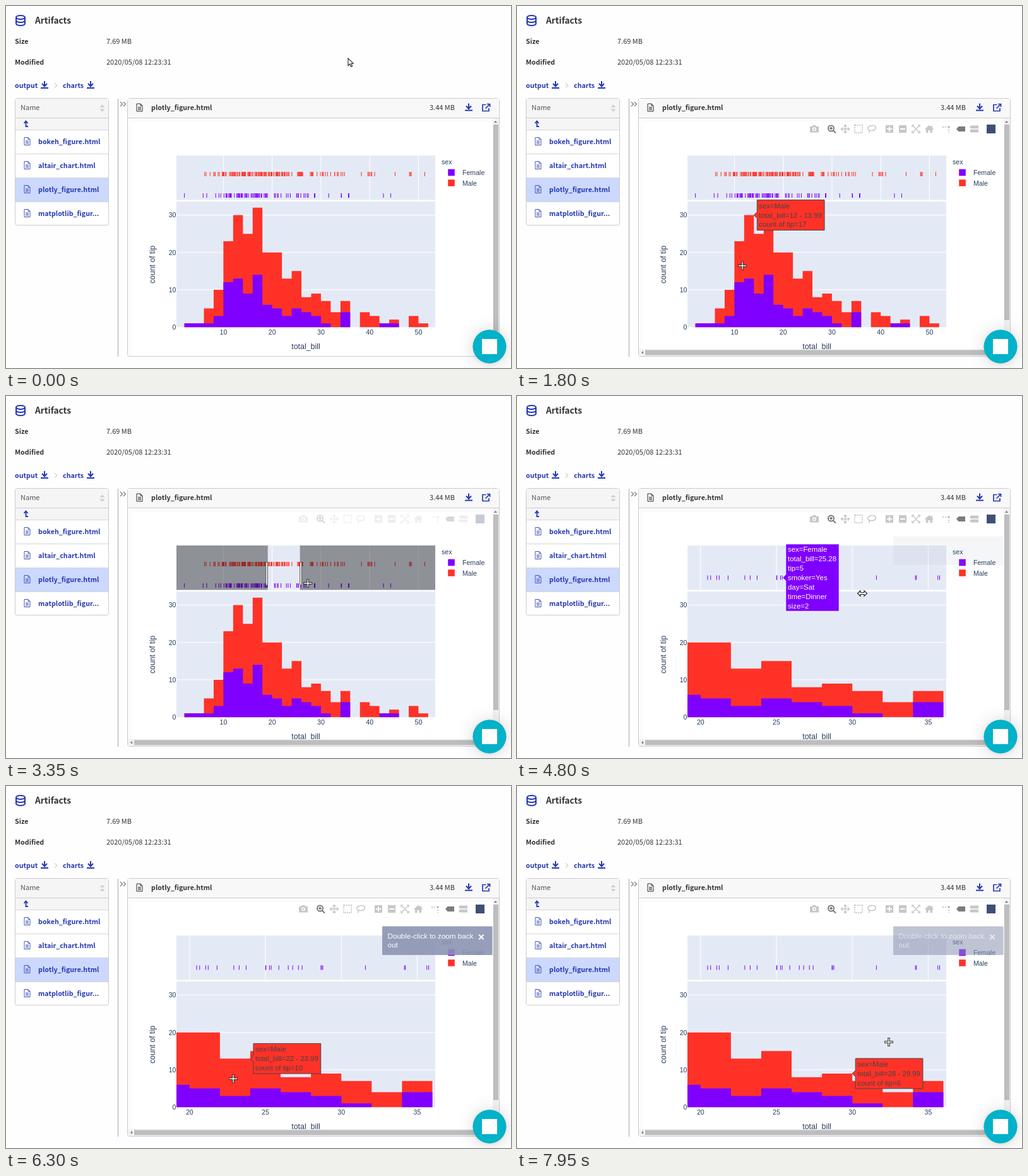
An HTML page with a canvas that plays this animation: 800x574 px, repeating every 8 s.

```html
<!DOCTYPE html>
<html lang="en">
<head>
<meta charset="utf-8">
<title>Artifacts</title>
<style>
html, body { margin: 0; width: 100%; height: 100%; overflow: hidden; background: #fefefe; }
canvas { display: block; }
</style>
</head>
<body>
<canvas id="stage" width="800" height="574"></canvas>
<script>
const ctx = document.getElementById('stage').getContext('2d');
const LOOP = 8000;
const UI = '"Noto Sans CJK JP", "Noto Sans CJK SC", "Noto Sans CJK", "Noto Sans", sans-serif';
const PLOT = '"Liberation Sans", Arial, sans-serif';
const BLUE = '#2539b0', INK = '#333', RED = '#ff3228', PURPLE = '#7f00ff', PANEL = '#e4eaf5', AXIS = '#2a3f5f';

// Timeline
const ENTER = 900, PRESS = 3160, RELEASE = 4400, ZOOM = 4600, NOTE_OUT = 7630;
const HOVER_LAG = 150, DRAG_LAG = 38;
const START = { x: 414.7, y: 280 };

// Pointer stops: time, x, y
const path = [
  [250, 542, 83], [880, 500, 172], [1650, 367, 407], [1800, 357, 412],
  [2500, START.x, START.y], [PRESS, START.x, START.y], [3350, 478, 297],
  [3650, 547, 313], [4850, 547, 313], [5450, 386.4, 478], [6000, 386.4, 478],
  [6700, 325, 446], [6950, 345, 453], [7600, 505, 478], [7800, 525, 478], [7950, 589, 406]
];

// Histogram counts per bin
const total = [1, 1, 5, 10, 23, 30, 25, 32, 20, 20, 13, 15, 8, 9, 7, 4, 7, 0, 4, 3, 1, 2, 0, 3, 1];
const women = [1, 1, 1, 3, 12, 13, 9, 14, 6, 5, 3, 5, 4, 3, 1, 0, 4, 0, 0, 0, 1, 1, 0, 0, 0];
const men = total.map((n, i) => n - women[i]);
const binStart = i => 2 + 2 * i;

// Single bills are scattered inside their bins
let seed = 7;
const random = () => (seed = (seed * 16807) % 2147483647) / 2147483647;
const scatter = counts => counts.flatMap((n, i) =>
  Array.from({ length: n }, () => binStart(i + random())));
const womenBills = scatter(women), menBills = scatter(men);

const clamp = v => Math.max(0, Math.min(1, v));
const smooth = v => { v = clamp(v); return v * v * (3 - 2 * v); };
const cubic = v => { v = clamp(v); return v < .5 ? 4 * v ** 3 : 1 - 4 * (1 - v) ** 3; };

function pointer(t) {
  let i = 1;
  while (i < path.length - 1 && path[i][0] < t) i++;
  const [t0, x0, y0] = path[i - 1], [t1, x1, y1] = path[i];
  const k = clamp((t - t0) / (t1 - t0));
  return { x: x0 + (x1 - x0) * k, y: y0 + (y1 - y0) * k };
}

function rect(x, y, w, h, color) {
  ctx.fillStyle = color;
  ctx.fillRect(x, y, w, h);
}
function text(s, x, y, size, color, { bold = false, font = PLOT, align = 'left' } = {}) {
  ctx.font = `${bold ? 700 : 400} ${size}px ${font}`;
  ctx.textAlign = align;
  ctx.fillStyle = color;
  ctx.fillText(s, x, y);
}
const label = (s, x, y, color = INK, bold = true, size = bold ? 10.7 : 11) =>
  text(s, x, y, size, color, { bold, font: UI });

function icon(x, y, d, color, { width = 1.5, fill = false } = {}) {
  ctx.save();
  ctx.translate(x, y);
  const p = new Path2D(d);
  if (fill) {
    ctx.fillStyle = color;
    ctx.fill(p, 'evenodd');
  } else {
    ctx.strokeStyle = color;
    ctx.lineWidth = width;
    ctx.stroke(p);
  }
  ctx.restore();
}
function box(x, y, w, h, r, fill, stroke, width = 1) {
  ctx.beginPath();
  ctx.roundRect(x, y, w, h, r);
  ctx.fillStyle = fill;
  ctx.fill();
  ctx.strokeStyle = stroke;
  ctx.lineWidth = width;
  ctx.stroke();
}

const download = (x, y) => icon(x, y, 'M0-6V2M-4-2L0 2.5L4-2M-6 5H6', BLUE, { width: 2 });
const sheet = (x, y, color) =>
  icon(x, y, 'M-4.5-6H1.5L4.5-3V6H-4.5ZM1.5-6V-3H4.5M-2.5-.5H2.5M-2.5 1.5H2.5M-2.5 3.5H2.5', color, { width: 1 });

function drawPage() {
  rect(0, 0, 800, 574, '#fefefe');
  icon(23, 23, 'M-7-5A7 3 0 0 1 7-5A7 3 0 0 1-7-5V5A7 3 0 0 0 7 5V-5M-7 0A7 3 0 0 0 7 0', BLUE, { width: 2 });
  label('Artifacts', 46, 28, INK, true, 13.7);
  label('Size', 14, 60);
  label('7.69 MB', 159, 60, INK, false);
  label('Modified', 14, 93);
  label('2020/05/08 12:23:31', 159, 93, INK, false);
  label('output', 14, 130, BLUE);
  download(61, 125);
  icon(79, 126, 'M-2-3.5L2 0L-2 3.5', '#bbb', { width: 1 });
  label('charts', 90, 130, BLUE);
  download(134, 125);

  box(14.5, 146.5, 148, 201, 3, '#fff', '#ccc');
  rect(15, 147, 147, 49, '#f5f5f6');
  rect(15, 177, 147, 1, '#ccc');
  label('Name', 23, 165, '#555', false);
  icon(152.5, 162, 'M-4-1.5L0-5.5L4-1.5ZM-4 1.5L0 5.5L4 1.5Z', '#ccc', { fill: true });
  icon(31, 186.5, 'M4 4.5H.5V-3M-2.5-.5L.5-4L3.5-.5', BLUE, { width: 1.8 });
  rect(15, 272, 147, 38, '#ccd8fd');
  ['bokeh_figure.html', 'altair_chart.html', 'plotly_figure.html', 'matplotlib_figur...'].forEach((name, i) => {
    const y = 196 + i * 38;
    rect(15, y, 147, 1, '#d4d4d8');
    sheet(33.5, y + 18.5, '#4356b8');
    label(name, 51, y + 23, BLUE);
  });

  rect(177, 147, 1, 409, '#aaa');
  icon(185.5, 155.5, 'M-4.5-3.5L-1 0L-4.5 3.5M.5-3.5L4 0L.5 3.5', '#777', { width: 1.2 });
  box(192.5, 146.5, 589, 409, 3, '#fcfcfd', '#ccc');
  rect(193, 147, 588, 30, '#f8f8f9');
  rect(193, 177, 588, 1, '#ccc');
  sheet(211.5, 161, INK);
  label('plotly_figure.html', 230, 165);
  label('3.44 MB', 671, 165, INK, false);
  download(733, 160.5);
  icon(760.5, 161, 'M0-4.5H-5.5V5.5H4.5V1M1.5-5.5H6V-1M6-5.5L-1 1.5', BLUE, { width: 1.7 });
  rect(200, 184, 571, 371, '#fff');
}

const yMain = n => 509.2 - n * 5.923;
const xScale = zoomed => zoomed ? v => 290.8 + (v - 20) * 24.04 : v => 344.4 + (v - 10) * 7.725;

function drawRug(bills, x, y, color) {
  for (const px of bills.map(x)) {
    if (px > 270 && px < 680) rect(px - .5, y - 3.5, 1, 7, color);
  }
}

// One stepped outline per series leaves no seams between bars
function drawSteps(counts, x, color) {
  ctx.beginPath();
  ctx.moveTo(x(binStart(0)), yMain(0));
  counts.forEach((n, i) => {
    ctx.lineTo(x(binStart(i)), yMain(n));
    ctx.lineTo(x(binStart(i + 1)), yMain(n));
  });
  ctx.lineTo(x(binStart(counts.length)), yMain(0));
  ctx.fillStyle = color;
  ctx.fill();
}

function drawPlot(zoomed) {
  const x = xScale(zoomed);
  rect(270, 237, 410, 70.5, PANEL);
  rect(270, 310, 410, 199.3, PANEL);
  for (let v = zoomed ? 20 : 10; x(v) < 680; v += zoomed ? 5 : 10) {
    rect(x(v) - .5, 237, 1, 70.5, '#fff');
    text(v, x(v), 521, 10.6, AXIS, { align: 'center' });
  }
  for (let n = 0; n <= 30; n += 10) {
    if (n) rect(270, yMain(n) - .5, 410, 1, '#fff');
    text(n, 269.5, yMain(n) + 3.9, 10.6, AXIS, { align: 'right' });
  }
  ctx.save();
  ctx.beginPath();
  ctx.rect(270, 310, 410, 200);
  ctx.clip();
  drawSteps(total, x, RED);
  drawSteps(women, x, PURPLE);
  ctx.restore();
  if (!zoomed) drawRug(menBills, x, 266.5, RED);
  drawRug(womenBills, x, zoomed ? 288 : 300.5, PURPLE);

  text('total_bill', 475, 543.7, 12.4, AXIS, { align: 'center' });
  ctx.save();
  ctx.translate(235.5, 410);
  ctx.rotate(-Math.PI / 2);
  text('count of tip', 0, 0, 12.3, AXIS, { align: 'center' });
  ctx.restore();
  text('sex', 690, 251, 10.6, AXIS);
  [['Female', PURPLE], ['Male', RED]].forEach(([name, color], i) => {
    const y = 264 + i * 16.5;
    rect(700.2, y - 5.3, 10.6, 10.6, color);
    text(name, 723, y + 4.2, 10.6, AXIS);
  });
}

function drawSelection(t) {
  const p = pointer(t - DRAG_LAG);
  const w = p.x - START.x;
  if (w < 1) return;
  const both = p.y - START.y > 17.6;
  const top = both ? START.y : 237, bottom = both ? Math.min(p.y, 307.5) : 307.5;
  ctx.beginPath();
  ctx.rect(270, 237, 410, 70.5);
  ctx.rect(START.x, top, w, bottom - top);
  ctx.fillStyle = `rgba(0,0,0,${.4 * clamp((t - PRESS) / 200)})`;
  ctx.fill('evenodd');
  if (!both) {
    for (const x of [START.x - 3, p.x]) box(x, 263.5, 2.6, 36.5, 0, '#fff', '#444', .9);
    return;
  }
  const arm = Math.min(bottom - top, w, 18) / 2;
  for (const [cx, sx] of [[START.x, 1], [p.x, -1]]) {
    for (const [cy, sy] of [[top, 1], [bottom, -1]]) {
      const d = `M${arm * sx} ${-2 * sy}H${-2 * sx}V${arm * sy}`;
      icon(cx, cy, d, '#444', { width: 4.6 });
      icon(cx, cy, d, '#fff', { width: 2.8 });
    }
  }
}

function drawModebar(opacity) {
  if (opacity <= 0) return;
  const pale = '#c7c7c7', dark = '#7c7c7c';
  const solid = { fill: true };
  ctx.save();
  ctx.globalAlpha = opacity;
  icon(471, 195, 'M-7-4H-3.5L-2-6H2L3.5-4H7V5.5H-7ZM0-2.7A3 3 0 0 0 0 3.3A3 3 0 0 0 0-2.7M0-1.2A1.5 1.5 0 0 1 0 1.8A1.5 1.5 0 0 1 0-1.2', pale, solid);
  icon(497.5, 194, 'M4.5 0A4.5 4.5 0 1 1-4.5 0A4.5 4.5 0 1 1 4.5 0M3.2 3.2L7.5 7.5M-2.3 0H2.3M0-2.3V2.3', dark, { width: 2 });
  icon(520, 195, 'M-6 0H6M0-6V6M-4-2.5L-6.5 0L-4 2.5M4-2.5L6.5 0L4 2.5M-2.5-4L0-6.5L2.5-4M-2.5 4L0 6.5L2.5 4', pale);
  ctx.setLineDash([2, 1.6]);
  icon(541, 195, 'M-6-6H6V6H-6Z', pale, { width: 1.8 });
  ctx.setLineDash([]);
  icon(562, 195, 'M-4 2.5C-10-2-3-6 2-5.5C9-5 7 2 1 2.5C-2 3-5 1-4 3C-3 4-5 5-4 6.5', pale);
  icon(590, 195, 'M-6-6H6V6H-6ZM-1-4V-1H-4V1H-1V4H1V1H4V-1H1V-4Z', pale, solid);
  icon(611, 195, 'M-6-6H6V6H-6ZM-4-1V1H4V-1Z', pale, solid);
  icon(632, 195, 'M-6-3V-6H-3M3-6H6V-3M6 3V6H3M-3 6H-6V3M-4.5-4.5L4.5 4.5M4.5-4.5L-4.5 4.5', pale);
  icon(653, 195, 'M-7 0L0-6L3-3.5V-5H5V-1.8L7 0L6 1L5 .3V6H1.5V2H-1.5V6H-5V.3L-6 1Z', pale, solid);
  icon(680, 195, 'M-6-3H-4M-2-3H0M4-5V-1M4 1V3M4 5V6M2-3H6', pale, { width: 2 });
  icon(703, 195, 'M-7 0L-3.5-4H7V4H-3.5Z', dark, solid);
  icon(724, 195, 'M-7-3L-5-5.5H7V-.8H-5ZM-7 3L-5 .8H7V5.5H-5Z', pale, solid);
  rect(744, 188, 14, 14, '#3f4f75');
  ctx.restore();
}

function drawHover(x, y, lines, female) {
  ctx.font = `11.4px ${PLOT}`;
  const w = Math.max(...lines.map(s => ctx.measureText(s).width)) + 7;
  const h = lines.length * 14.6 + 4;
  const left = x + 5, top = y - h / 2;
  const d = `M${x} ${y}L${left} ${y - 5}V${top}h${w}v${h}H${left}V${y + 5}Z`;
  icon(0, 0, d, female ? PURPLE : RED, { fill: true });
  icon(0, 0, d, female ? '#f4f0ff' : '#444', { width: female ? .5 : 1 });
  lines.forEach((s, i) => {
    text(s, left + 3, y + (i - (lines.length - 1) / 2) * 14.85 + 4, 11.4, female ? '#fff' : '#444');
  });
}

const guest = (bill, tip, smoker, day) => ['sex=Female', `total_bill=${bill}`, `tip=${tip}`,
  `smoker=${smoker}`, `day=${day}`, 'time=Dinner', 'size=2'];

function drawHovers(t, zoomed) {
  const x = xScale(zoomed);
  if (t >= 2400 && t < PRESS) return drawHover(x(18.78) + 3.5, 300.5, guest(18.78, 3, 'No', 'Thur'), true);
  if (t >= PRESS && t < ZOOM) return;
  if (t >= ZOOM && t < 4950) return drawHover(x(25.28) + 3.3, 288, guest(25.28, 5, 'Yes', 'Sat'), true);
  const p = pointer(t - HOVER_LAG);
  if (p.y < 310 || p.y > 509) return;
  const bin = total.findIndex((n, i) => p.x >= x(binStart(i)) && p.x < x(binStart(i + 1)));
  if (bin < 0 || p.y < yMain(total[bin])) return;
  const female = p.y > yMain(women[bin]);
  const from = binStart(bin);
  drawHover(x(from + 2), yMain((female ? women : total)[bin]), [
    `sex=${female ? 'Female' : 'Male'}`,
    `total_bill=${from} - ${from + 1}.99`,
    `count of tip=${(female ? women : men)[bin]}`
  ], female);
}

function drawNote(t) {
  const opacity = cubic((t - ZOOM) / 700) * (1 - cubic((t - NOTE_OUT) / 700));
  if (opacity <= 0) return;
  ctx.save();
  ctx.globalAlpha = opacity;
  rect(596, 222.5, 174.5, 45.5, 'rgba(140,148,178,.9)');
  text('Double-click to zoom back', 604.5, 241.5, 11.65, '#fff');
  text('out', 604.5, 255.5, 11.65, '#fff');
  icon(753, 239.5, 'M-3.7-3.7L3.7 3.7M3.7-3.7L-3.7 3.7', '#fff', { width: 2 });
  ctx.restore();
}

function drawBars(entered) {
  rect(771, 178, 10, 377, '#f2f2f3');
  icon(775.5, 183.5, 'M-2.5 1.5L0-1.5L2.5 1.5Z', '#777', { fill: true });
  rect(772, 188, 8, entered ? 310 : 328, '#bdbdbf');
  if (!entered) return;
  rect(193, 544, 578, 11, '#f2f2f3');
  icon(198.5, 549.5, 'M1.5-2.5L-1.5 0L1.5 2.5Z', '#777', { fill: true });
  rect(203, 545.5, 541, 8, '#bdbdbf');
}

function drawChat() {
  ctx.save();
  ctx.beginPath();
  ctx.arc(766, 540, 26.4, 0, 2 * Math.PI);
  ctx.fillStyle = '#02b2c8';
  ctx.shadowOffsetY = 1;
  for (const [blur, alpha] of [[28, .16], [5, .08]]) {
    ctx.shadowColor = `rgba(0,0,0,${alpha})`;
    ctx.shadowBlur = blur;
    ctx.fill();
  }
  ctx.restore();
  rect(754, 528, 24, 24, '#fff');
}

function drawCursor(t) {
  const { x, y } = pointer(t);
  const dragging = t >= PRESS && t < ZOOM;
  const inside = x > 270 && x < 680;
  const outlined = d => {
    icon(x, y, d, '#fff', { fill: true });
    icon(x, y, d, '#222', { width: 1.1 });
  };
  if (!dragging && inside && y > 307 && y < 320) {
    outlined('M-7.5 0L-3-4.5V-1.5H3V-4.5L7.5 0L3 4.5V1.5H-3V4.5Z');
  } else if (dragging || (inside && y > 237 && y < 510)) {
    icon(x, y, 'M-7 0H7M0-7V7', '#222', { width: 3.4 });
    icon(x, y, 'M-6.2 0H6.2M0-6.2V6.2', '#fff', { width: 1.4 });
  } else {
    outlined('M0 0V11.5L2.7 9L4.6 13.3L6.6 12.4L4.8 8.2H8.3Z');
  }
}

function draw(t) {
  const zoomed = t >= ZOOM;
  const modebar = smooth((t - ENTER) / 300) - smooth((t - PRESS) / 300) + smooth((t - RELEASE) / 300);
  drawPage();
  drawPlot(zoomed);
  if (t >= PRESS && !zoomed) drawSelection(t);
  drawModebar(modebar);
  drawNote(t);
  drawHovers(t, zoomed);
  drawBars(t >= ENTER);
  drawChat();
  drawCursor(t);
}

const begin = performance.now();
function tick() {
  draw((performance.now() - begin) % LOOP);
  requestAnimationFrame(tick);
}
tick();
</script>
</body>
</html>
```
